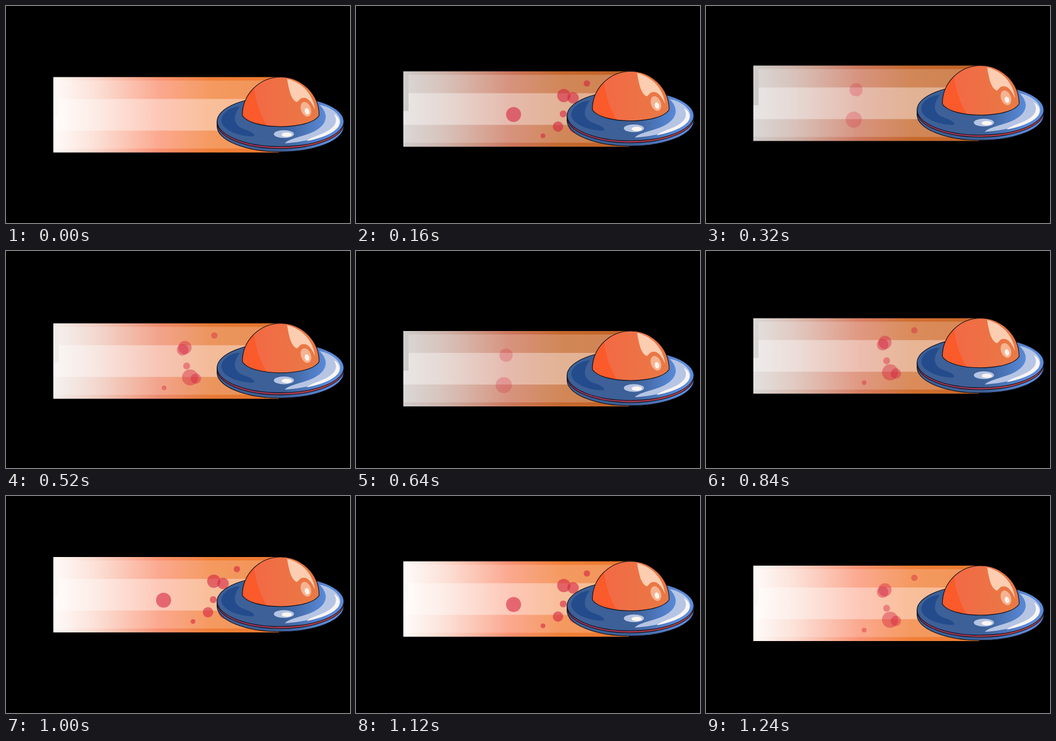
Animation of 596 by 377 pixels, one loop 1.28 s. Source, as an HTML page:

```html
<!DOCTYPE html>
<html lang="en">
<head>
<meta charset="utf-8">
<title>Flying saucer</title>
<style>
  html, body { margin: 0; width: 100%; height: 100%; overflow: hidden; background: #000; }
  svg { display: block; width: 596px; height: 377px; }
  .line { stroke: #0c0c14; stroke-width: 1.1; }
</style>
</head>
<body>
<svg viewBox="0 0 596 377">
  <defs>
    <linearGradient id="glow">
      <stop offset="0" stop-color="#fdfaf8"/>
      <stop offset=".18" stop-color="#fbdacf"/>
      <stop offset=".47" stop-color="#fa9273"/>
      <stop offset=".7" stop-color="#f18038"/>
      <stop offset="1" stop-color="#ee792e"/>
    </linearGradient>
    <linearGradient id="hull">
      <stop offset=".52" stop-color="#3c6097"/>
      <stop offset=".88" stop-color="#5b8cdc"/>
    </linearGradient>
    <linearGradient id="stripe">
      <stop offset=".3" stop-color="#a83a60"/>
      <stop offset="1" stop-color="#d24640"/>
    </linearGradient>
    <linearGradient id="glass">
      <stop offset=".2" stop-color="#f26a45"/>
      <stop offset="1" stop-color="#e87a44"/>
    </linearGradient>
    <path id="domeShape" d="M409.5 66.5A66.5 66.5 0 0 1 542.5 66.5C527 92.5 425 92.5 409.5 66.5Z"/>
    <clipPath id="domeClip"><use href="#domeShape"/></clipPath>
  </defs>
  <g id="craft">
    <rect id="beam" x="82" width="391" height="131" fill="url(#glow)"/>
    <g fill="#fff">
      <path d="M91 6H473V124H82V69H91Z" opacity=".2"/>
      <path d="M91 38H473V93H82V69H91Z" opacity=".36"/>
    </g>
    <g id="puffs" fill="#d4203f"></g>

    <g class="line">
      <ellipse cx="475.5" cy="85.5" rx="109.8" ry="44.3" fill="url(#hull)"/>
      <ellipse cx="475.5" cy="80" rx="109.8" ry="44.2" fill="url(#stripe)"/>
      <ellipse cx="475.5" cy="77" rx="109.8" ry="43.7" fill="url(#hull)"/>
    </g>
    <path fill="#244b8b" d="M405 51C386 52 373 64 373 76C375 93 405 103 428 103C434 101 426 95 414 91C396 85 390 72 405 51Z"/>
    <path fill="#b6c5e4" d="M543 48C566 53 581 66 579 79C576 98 535 111 483 115C489 109 504 105 520 100C550 91 566 70 543 48Z"/>
    <path fill="#faf5f2" d="M568 64C578 69 580 78 576 86C568 98 544 107 521 111C527 105 541 102 553 96C573 86 575 75 568 64Z"/>
    <ellipse cx="481.5" cy="99" rx="17.5" ry="6.7" fill="#b4c4e2"/>
    <ellipse cx="486.5" cy="100" rx="9" ry="3.8" fill="#fdf6f0"/>

    <use href="#domeShape" fill="url(#glass)"/>
    <g clip-path="url(#domeClip)">
      <path fill="#fb5a2b" d="M400 20H430C433 45 441 68 453 86L400 92Z"/>
      <path fill="#fccdb0" d="M487 3C512 9 532 29 535.5 57C530 44 524 36 516 36C509 36 508 41 504 43.5C493 39 490 20 487 3Z"/>
    </g>
    <ellipse cx="519.7" cy="56" rx="8.6" ry="13.2" fill="#f5b392" transform="rotate(-20 519.7 56)"/>
    <ellipse cx="521.5" cy="59.5" rx="3.9" ry="5.7" fill="#fff3ea" transform="rotate(-15 521.5 59.5)"/>
    <use href="#domeShape" class="line" fill="none"/>
  </g>
</svg>
<script>
const LOOP = 1280, BEAT = 320, FRAME = 40, TRAIL_END = 255;
const byId = id => document.getElementById(id);

// Exhaust puffs: start x, y, radius, drift per step
const puffs = [
  [400, 21, 5.5, 39], [360, 42, 11.5, 50], [376, 46, 10, 70], [359, 74, 6, 46],
  [350, 96, 9, 21], [324, 112, 4, 50], [273, 75, 13, 50], [382, 94, 14, 63]
].map(([x, y, radius, drift]) => {
  const circle = document.createElementNS("http://www.w3.org/2000/svg", "circle");
  circle.setAttribute("cy", y);
  circle.setAttribute("r", radius);
  byId("puffs").append(circle);
  return { circle, x, radius, drift };
});

// Triangle wave from 1 down to 0 and back
const wave = (t, period) => Math.abs(2 * (t % period) / period - 1);

// The middle half of the loop swings lower
function craftTop(t) {
  const swing = Math.abs(t - LOOP / 2) < BEAT ? 35.5 : 20;
  return 103.5 + swing * wave(t, 2 * BEAT);
}

// Two dips, then steady light
const beamOpacity = t => t < 960 ? .73 + .27 * wave(t, 480) : 1;

// Puffs drift back in three steps per beat; small ones burn out early
function drawPuffs(t) {
  const step = Math.floor((t + BEAT - FRAME) % BEAT / (BEAT / 2 - FRAME / 2) * .9375);
  const last = t % BEAT < FRAME;
  const age = last ? 2 : Math.min(step, 1);
  for (const { circle, x, radius, drift } of puffs) {
    const cx = x - drift * age;
    const alive = t >= FRAME && cx > TRAIL_END && (age < 2 || radius > 10);
    circle.setAttribute("cx", cx);
    circle.setAttribute("opacity", alive ? .58 - .17 * age : 0);
  }
}

function draw(t) {
  byId("craft").setAttribute("transform", `translate(0 ${craftTop(t)})`);
  byId("beam").setAttribute("opacity", beamOpacity(t));
  drawPuffs(t);
}

function tick(now) {
  draw(Math.floor(now % LOOP / FRAME) * FRAME);
  requestAnimationFrame(tick);
}
draw(0);
const start = performance.now();
requestAnimationFrame(function first(now) {
  tick(Math.max(0, now - start));
});
</script>
</body>
</html>
```
